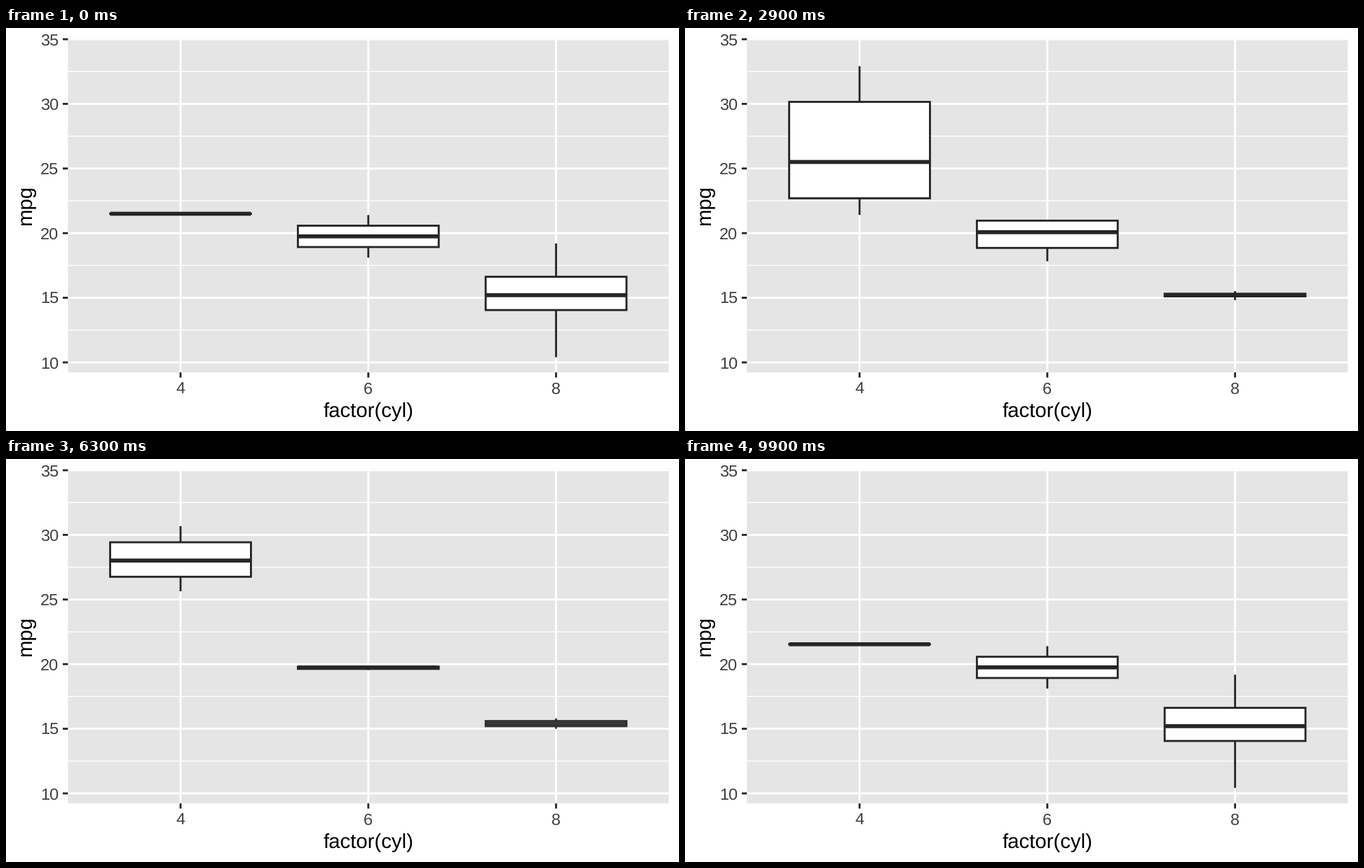
These frames come from a looping animation (960x576 px, 10 s). A matplotlib script:

```python
import numpy as np
import matplotlib.pyplot as plt
from matplotlib.animation import FuncAnimation
from matplotlib.patches import Rectangle

plt.rcParams.update({
    "font.family": "Liberation Sans",
    "path.snap": False,
    "path.simplify": False,
    "text.hinting": "none",
})

W, H, DPI = 960, 576, 96
PX = 72 / DPI                       # points per pixel
FRAMES, INTERVAL = 100, 100
INK, PANEL, TICK_TEXT = "#262626", "#e5e5e5", "#404040"
LEFT, RIGHT, TOP, BOTTOM = 88.3, 945.33, 14.67, 492.27
LINE = 2.845                        # base line width in pixels
TICK = 7.33
Y_LOW, Y_HIGH = 9.225, 35.075
UNIT = (RIGHT - LEFT) / 3.2         # width of one category
BOX_W = 0.75 * UNIT

# mpg values per gear, then per cylinder count (4, 6, 8)
GEARS = [
    [[21.5],
     [21.4, 18.1],
     [18.7, 14.3, 16.4, 17.3, 15.2, 10.4, 10.4, 14.7, 15.5, 15.2, 13.3, 19.2]],
    [[22.8, 24.4, 22.8, 32.4, 30.4, 33.9, 27.3, 21.4],
     [21.0, 21.0, 19.2, 17.8],
     []],
    [[26.0, 30.4],
     [19.7],
     [15.8, 15.0]],
]
# first frame, last frame, state before, state after
TWEENS = [(11, 33, 0, 1), (45, 67, 1, 2), (79, 100, 2, 0)]


def x_pos(i):
    return LEFT + (0.6 + i) * UNIT


def y_pos(v):
    return BOTTOM - (v - Y_LOW) / (Y_HIGH - Y_LOW) * (BOTTOM - TOP)


def summary(values):
    """Minimum, quartiles and maximum, or None for an empty group."""
    return np.percentile(values, [0, 25, 50, 75, 100]) if values else None


STATES = [[summary(group) for group in gear] for gear in GEARS]


def sine_in_out(t):
    return (1 - np.cos(np.pi * t)) / 2


def blend(a, b, e):
    """Five-number summary and opacity of a box part-way from a to b."""
    if a is None and b is None:
        return None, 0
    if a is None:                   # fade in
        return b, e
    if b is None:                   # shrink onto the median
        return a + (a[2] - a) * e, float(e < 1)
    return a + (b - a) * e, 1


def boxes_at(n):
    current = 0
    for start, end, a, b in TWEENS:
        if n <= start:
            break
        if n < end:
            e = sine_in_out((n - start) / (end - start))
            return [blend(p, q, e) for p, q in zip(STATES[a], STATES[b])]
        current = b
    return [(s, float(s is not None)) for s in STATES[current]]


fig = plt.figure(figsize=(W / DPI, H / DPI), dpi=DPI, facecolor="white")
ax = fig.add_axes([0, 0, 1, 1])
ax.set_xlim(0, W)
ax.set_ylim(H, 0)
ax.axis("off")


def line(xs, ys, color, width, z):
    return ax.plot(xs, ys, color=color, lw=width * PX, zorder=z,
                   solid_capstyle="butt")[0]


def label(x, y, s, size, color, ha="center", rotation=0):
    ax.text(x, y, s, fontsize=size, color=color, ha=ha, va="baseline",
            rotation=rotation, rotation_mode="anchor", zorder=3)


def draw_axes():
    ax.add_patch(Rectangle((LEFT, TOP), RIGHT - LEFT, BOTTOM - TOP,
                           fc=PANEL, ec="none", zorder=0))
    for v in np.arange(12.5, 35, 5):
        line([LEFT, RIGHT], [y_pos(v)] * 2, "white", LINE / 2, 1)
    for v in range(10, 36, 5):
        y = y_pos(v)
        line([LEFT, RIGHT], [y, y], "white", LINE, 2)
        line([LEFT - TICK, LEFT], [y, y], INK, LINE, 3)
        label(LEFT - 13.2, y + 8.4, str(v), 17.6, TICK_TEXT, ha="right")
    for i, name in enumerate("468"):
        x = x_pos(i)
        line([x, x], [TOP, BOTTOM], "white", LINE, 2)
        line([x, x], [BOTTOM, BOTTOM + TICK], INK, LINE, 3)
        label(x, 522.3, name, 17.6, TICK_TEXT)
    label((LEFT + RIGHT) / 2, 555.6, "factor(cyl)", 22, "black")
    label(35.7, (TOP + BOTTOM) / 2, "mpg", 22, "black", rotation=90)


class Box:
    def __init__(self, i):
        x = x_pos(i)
        self.left = x - BOX_W / 2
        self.whiskers = [line([x, x], [0, 0], INK, LINE, 4) for _ in range(2)]
        self.body = ax.add_patch(Rectangle(
            (self.left, 0), BOX_W, 1, fc="white", ec=INK, lw=LINE * PX,
            joinstyle="miter", zorder=5))
        self.median = line([self.left, self.left + BOX_W], [0, 0],
                           INK, LINE * 2, 6)
        self.parts = [*self.whiskers, self.body, self.median]

    def show(self, stats, alpha):
        for part in self.parts:
            part.set_visible(alpha > 0)
            part.set_alpha(alpha)
        if stats is None:
            return
        low, q1, mid, q3, high = y_pos(stats)
        self.whiskers[0].set_ydata([q3, high])
        self.whiskers[1].set_ydata([q1, low])
        self.body.set_y(q3)
        self.body.set_height(max(q1 - q3, 0.02))   # keeps corners mitred
        self.median.set_ydata([mid, mid])


draw_axes()
boxes = [Box(i) for i in range(3)]


def update(n):
    for box, (stats, alpha) in zip(boxes, boxes_at(n)):
        box.show(stats, alpha)
    return [part for box in boxes for part in box.parts]


anim = FuncAnimation(fig, update, frames=FRAMES, interval=INTERVAL,
                     repeat=True, repeat_delay=0, blit=False)
plt.show()
```
